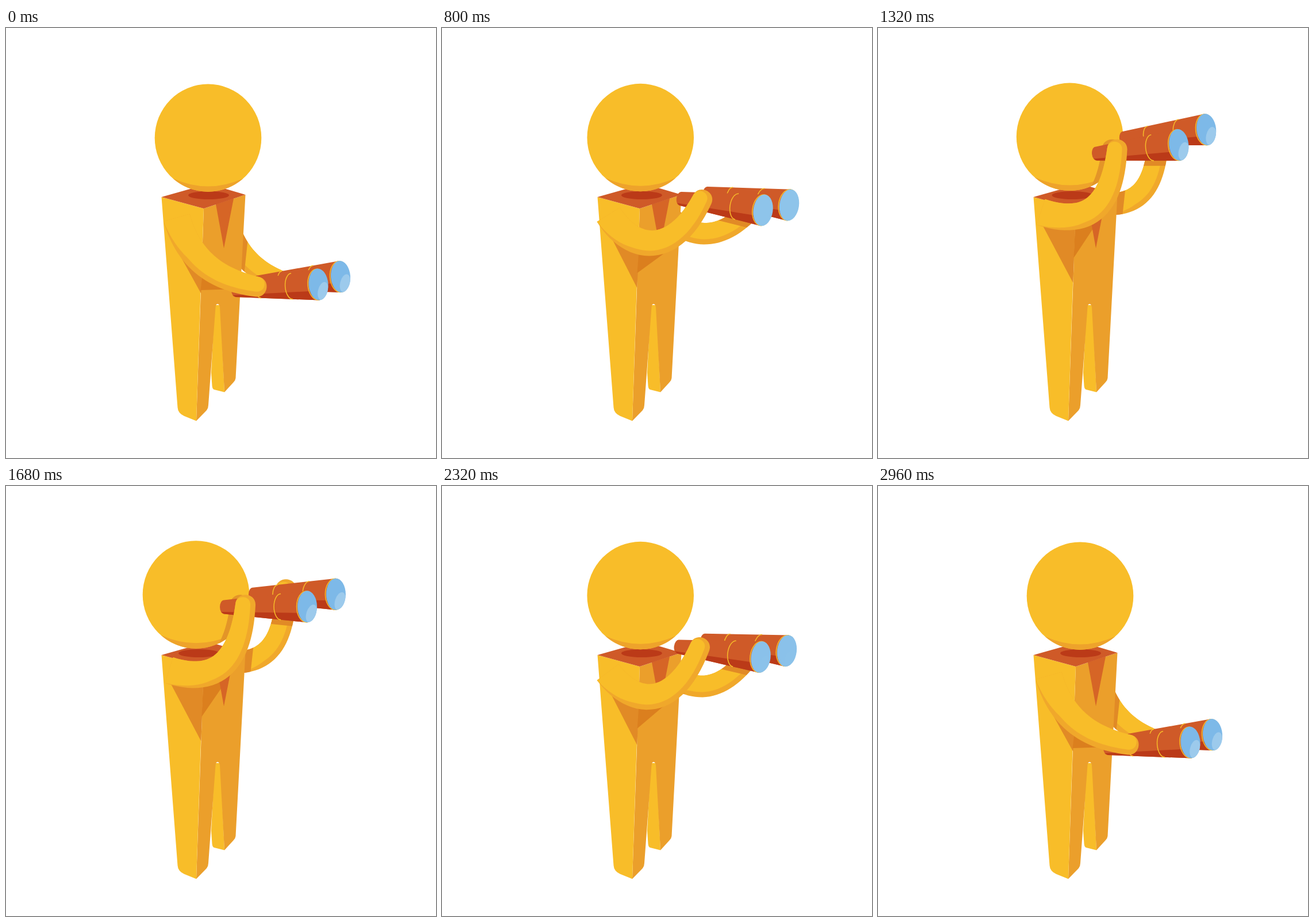
Animation, 748 px wide and 748 px high, one loop 3000 ms. Source, as an HTML page:

```html
<!DOCTYPE html>
<html lang="en">
<head>
<meta charset="utf-8">
<title>Looking through binoculars</title>
<style>
  html, body { margin: 0; width: 100%; height: 100%; overflow: hidden; background: #fff; }
  svg { display: block; width: 100vw; height: 100vh; }
  .skin { fill: #f8bd29; }
  .shade { fill: #f0a82b; }
  .front { fill: #eb9f2b; }
  .cast { fill: #e18a26; }
  .red { fill: #cf5a28; }
  .dark { fill: #bb3a18; }
  .ring { fill: none; stroke: #f7bc29; stroke-width: 1.5; }
</style>
</head>
<body>
<svg viewBox="0 0 748 748">
  <defs>
    <clipPath id="headClip"><ellipse rx="92.8" ry="93.7"/></clipPath>
    <clipPath id="farArmClip"><path id="farArmShape"/></clipPath>
    <clipPath id="lensClip"><ellipse rx="17" ry="27.5"/></clipPath>
    <path id="tube" d="M0-27.5L-145-12A7 12 0 0 0-145 12L0 27.5Z"/>
    <g id="barrel">
      <use href="#tube" class="red"/>
      <path class="dark" d="M-150 8.5L0 11V27.5L-145 12Z"/>
      <path class="ring" d="M-46-22.6A12 22.6 0 0 0-46 22.6M-101-16.7A9 16.7 0 0 0-101 16.7"/>
      <ellipse class="ring" cx="-1.5" rx="17" ry="27"/>
      <ellipse class="lens" rx="17" ry="27.5"/>
      <g clip-path="url(#lensClip)">
        <ellipse class="gloss" rx="8.5" ry="16" fill="#9ccaec" transform="translate(7 12) rotate(18)"/>
      </g>
    </g>
  </defs>

  <path id="farOuter" class="shade"/>
  <path id="farInner" class="skin"/>
  <g clip-path="url(#farArmClip)" class="cast">
    <path d="M400 250H433.5L414 430H400Z"/>
    <use id="tubeShadow" href="#tube"/>
  </g>

  <path class="skin" d="M363 482H373L380 633.5L362 629Q359 628 358.500 622L357 600Z"/>
  <path class="front" d="M344 314L416.500 290L399.500 609Q399 613 396 616L380 633.500L372 486Q371 480 368 480Q365 480 364.500 486L352 656Q352 661 349 665L331 683.500Z"/>
  <path class="skin" d="M270.500 294L344 314L338.500 460L331 683.500L310 675Q299 670 298.500 660Z"/>
  <path id="sideShadow" class="cast"/>
  <path id="frontShadow" fill="#db7f1e"/>
  <path fill="#d66526" d="M365 306.500L396 296.500L379 383Z"/>
  <path class="red" d="M270.500 294L344 314L416.500 290L352 271Z"/>
  <ellipse id="neck" class="dark" cy="291" rx="35.5" ry="7"/>

  <g id="head">
    <ellipse class="skin" rx="92.8" ry="93.7"/>
    <path fill="#eea32b" d="M-61 70.500A92.800 93.700 0 0 0 61 70.500Q0 98-61 70.500Z"/>
    <g clip-path="url(#headClip)"><path id="armOnHead" fill="#e39528"/></g>
  </g>

  <use id="farBarrel" href="#barrel"/>
  <use id="nearBarrel" href="#barrel"/>
  <path id="nearOuter" class="shade"/>
  <path id="nearInner" class="skin"/>
</svg>
<script>
const LOOP = 3000, STEP = 40;
const $ = id => document.getElementById(id);
const set = (id, attrs) => { for (const k in attrs) $(id).setAttribute(k, attrs[k]); };

// lens x, y, tilt | far lens offset | near arm c1, c2 | far arm c1, c2, end | gloss
const poses = {
  rest:  [543.5, 446, -4, 38.5, -13.5, 318, 405, 368, 438, 405, 400, 440, 428, 490, 445, 1],
  dip:   [547, 462, 4.5, 39.5, -7.5, 325, 402, 375, 432, 405, 395, 445, 425, 500, 445, 0],
  swing: [565, 385, 8, 44, -7, 326, 402, 392, 420, 418, 382, 462, 400, 515, 395, 0],
  level: [558.5, 317, 8, 45.5, -9, 330, 390, 402, 400, 430, 368, 480, 370, 528, 325, 0],
  raise: [523, 199, -10, 46, -30, 372, 350, 406, 310, 450, 315, 484, 285, 488, 205, 1],
  look:  [524, 210, 0, 50, -21.5, 370, 348, 408, 300, 452, 308, 485, 275, 487, 180, 1],
  lower: [524.5, 203.5, -10.5, 43.5, -28.5, 372, 352, 408, 318, 450, 320, 488, 295, 490, 210, 1]
};
const keys = [
  [0, 'rest'], [550, 'dip'], [690, 'swing'], [800, 'level'], [1080, 'raise'], [1640, 'look'],
  [2120, 'lower'], [2350, 'level'], [2430, 'swing'], [2520, 'dip'], [2840, 'rest']
].map(([time, name]) => ({ time, pose: poses[name] }));

const keyAt = i => {
  const n = keys.length, lap = Math.floor(i / n), key = keys[i - lap * n];
  return { time: key.time + lap * LOOP, pose: key.pose };
};

// Shape-preserving tangent: flat at every local extreme.
function tangent(i, c) {
  const a = keyAt(i - 1), b = keyAt(i), d = keyAt(i + 1);
  const left = (b.pose[c] - a.pose[c]) / (b.time - a.time);
  const right = (d.pose[c] - b.pose[c]) / (d.time - b.time);
  return left * right > 0 ? 2 * left * right / (left + right) : 0;
}

function poseAt(t) {
  const i = keys.findLastIndex(k => k.time <= t);
  const a = keyAt(i), b = keyAt(i + 1), span = b.time - a.time;
  const s = (t - a.time) / span, r = 1 - s;
  return a.pose.map((v, c) =>
    v * (1 + 2 * s) * r * r + b.pose[c] * (3 - 2 * s) * s * s +
    span * (tangent(i, c) * s * r * r - tangent(i + 1, c) * s * s * r));
}

const ease = x => (1 - Math.cos(Math.PI * Math.min(1, Math.max(0, x)))) / 2;
const headLean = t => t < 1670 ? ease((t - 300) / 1360) : 1 - ease((t - 1670) / 1030);

const point = (x, y) => x.toFixed(2) + ' ' + y.toFixed(2);
const polygon = (...pts) => 'M' + pts.map(p => point(...p)).join('L') + 'Z';

// Limb outline along a cubic, with a rounded hand; trim narrows the lower side.
function limb(p, width, trim) {
  const upper = [], lower = [], steps = 28;
  let cap;
  for (let k = 0; k <= steps; k++) {
    const s = k / steps, r = 1 - s;
    const at = j => r * r * r * p[0][j] + 3 * r * r * s * p[1][j] + 3 * r * s * s * p[2][j] + s * s * s * p[3][j];
    const slope = j => r * r * (p[1][j] - p[0][j]) + 2 * r * s * (p[2][j] - p[1][j]) + s * s * (p[3][j] - p[2][j]);
    const len = Math.hypot(slope(0), slope(1)), dx = slope(0) / len, dy = slope(1) / len;
    const h = width(s), g = h - trim * Math.min(1, s * 3);
    const up = [at(0) + dy * h, at(1) - dx * h], down = [at(0) - dy * g, at(1) + dx * g];
    upper.push(point(...up));
    lower.unshift(point(...down));
    const reach = (h + g) * 2 / 3;
    cap = [up, down].map(q => point(q[0] + dx * reach, q[1] + dy * reach));
  }
  return `M${upper.join('L')}C${cap.join(' ')} ${lower.join('L')}Z`;
}

const nearWidth = s => 23.5 - 6 * s * s;
const farWidth = s => 19.5 - 1.5 * s;

function draw(t) {
  const [x, y, tilt, fx, fy, ax, ay, bx, by, cx, cy, dx, dy, ex, ey, gloss] = poseAt(t);
  const drop = (y - 200) / 250, sq = drop * drop;
  const rad = tilt * Math.PI / 180, cos = Math.cos(rad), sin = Math.sin(rad);
  const hand = [x - 107.5 * cos + 3.5 * sin, y - 107.5 * sin - 3.5 * cos];
  const near = [[283 + 14 * drop, 320 + 10 * drop], [ax, ay], [bx, by], hand];
  const far = [[395 - 10 * drop, 305 + 38 * drop], [cx, cy], [dx, dy], [ex, ey]];

  const nearShape = limb(near, nearWidth, 0), farShape = limb(far, farWidth, 0);
  set('nearOuter', { d: nearShape });
  set('nearInner', { d: limb(near, nearWidth, 9) });
  set('farOuter', { d: farShape });
  set('farArmShape', { d: farShape });
  set('farInner', { d: limb(far, farWidth, 9) });

  const place = (px, py) => `translate(${point(px, py)}) rotate(${tilt.toFixed(2)})`;
  set('nearBarrel', { transform: place(x, y) });
  set('farBarrel', { transform: place(x + fx, y + fy) });
  set('tubeShadow', { transform: place(x, y + 9) });

  const armpit = [343, 345 + 75 * drop];
  set('sideShadow', { d: polygon([283 + 13 * sq, 337 + 47 * sq], armpit, [339.3, 443 + 19 * drop]) });
  set('frontShadow', { d: polygon(armpit, [388 + 12 * drop, 326 + 130 * drop], [340.5 - 2 * drop, 399 + 58 * drop]) });

  const lean = headLean(t), hx = 351.5 - 21 * lean, hy = 191.2 - 2.2 * lean;
  set('head', { transform: `translate(${point(hx, hy)})` });
  set('armOnHead', { d: nearShape, transform: `translate(${point(-hx - 9, -hy)})` });
  set('neck', { cx: 352.5 - 17 * lean });

  const glare = Math.max(0, (tilt - 4.5) / 3.5);
  const lens = [125 + 17 * glare, 185 + 11 * glare, 232 + 2 * glare].map(Math.round);
  document.querySelector('.lens').setAttribute('fill', `rgb(${lens})`);
  document.querySelector('.gloss').setAttribute('opacity', gloss.toFixed(3));
}

const start = performance.now();
function tick() {
  const t = (performance.now() - start) % LOOP;
  draw(Math.floor(t / STEP) * STEP);
  requestAnimationFrame(tick);
}
draw(0);
requestAnimationFrame(tick);
</script>
</body>
</html>
```
